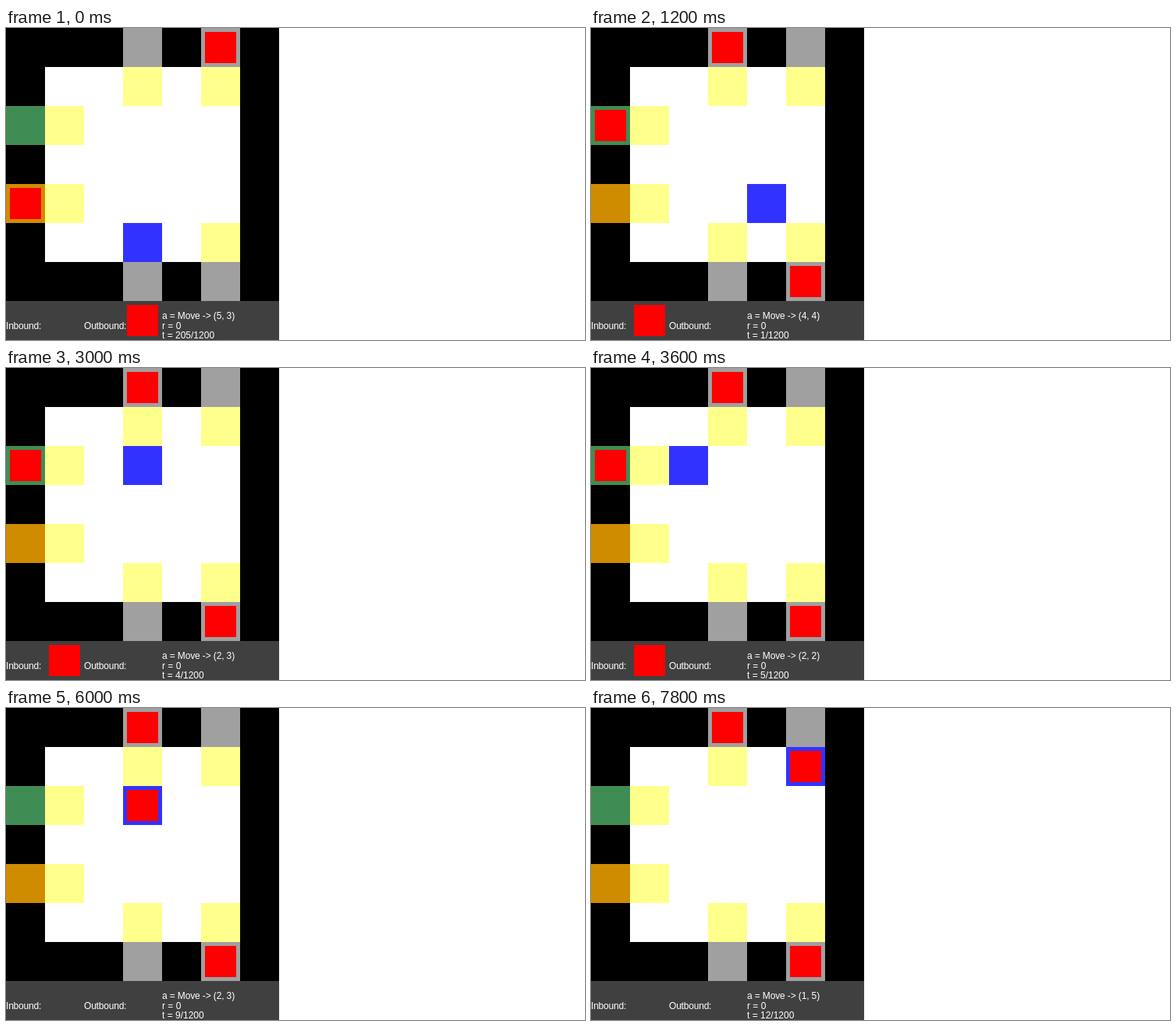
Write an HTML page with a canvas that moves like this. It is 742 by 400 pixels and loops after 8 s.

```html
<!DOCTYPE html>
<html lang="en">
<head>
<meta charset="utf-8">
<title>Grid transport</title>
<style>
  html, body { margin: 0; width: 100%; height: 100%; overflow: hidden; background: #fff; }
  canvas { display: block; }
</style>
</head>
<body>
<canvas id="stage" width="742" height="400"></canvas>
<script>
const ctx = document.getElementById('stage').getContext('2d');
const CELL = 50, STEP = 600, LOOP = 8000;
const COLORS = {
  '#': '#000', '.': '#fff', y: '#ffff8c', g: '#a0a0a0', i: '#408c55', o: '#d08c00'
};
const MAP = [
  '###g#g#',
  '#..y.y#',
  'iy....#',
  '#.....#',
  'oy....#',
  '#..y.y#',
  '###g#g#'
];
// Agent position [row, column] at each step
const PATH = [
  [5, 3], [4, 5], [4, 4], [4, 3], [3, 3], [2, 3], [2, 2],
  [2, 1], [2, 1], [2, 2], [2, 3], [1, 3], [1, 4], [1, 5]
];
const PICKUP = 8;

function cell(row, col, color, inset = 0) {
  ctx.fillStyle = color;
  ctx.fillRect(col * CELL + inset, row * CELL + inset, CELL - 2 * inset, CELL - 2 * inset);
}

const load = (row, col) => cell(row, col, '#f00', 5);

function label(text, x, y, spacing = 0) {
  ctx.letterSpacing = spacing + 'px';
  ctx.fillStyle = '#fff';
  ctx.fillText(text, x, y);
}

function draw(step) {
  const [row, col] = PATH[step];
  const first = step === 0;
  const loaded = step >= PICKUP;

  ctx.fillStyle = '#fff';
  ctx.fillRect(0, 0, 742, 400);
  MAP.forEach((line, r) => [...line].forEach((c, k) => cell(r, k, COLORS[c])));
  ctx.fillStyle = '#404040';
  ctx.fillRect(0, 350, 350, 50);

  cell(row, col, '#3232ff');
  if (loaded) load(row, col);

  if (first) {
    load(0, 5);
    load(4, 0);
    load(7, 3);
  } else {
    load(0, 3);
    load(6, 5);
    if (!loaded) {
      load(2, 0);
      load(7, 1);
    }
  }

  // The reset step still shows the last action and its reward
  const reset = step === 1;
  const target = reset ? [1, 5] : [row, col];
  ctx.font = '12px "Liberation Sans", Arial, sans-serif';
  label('Inbound:', 0, 386, -0.2);
  label('Outbound:', 100, 386, -0.2);
  label(`a = Move -> (${target.join(', ')})`, 200, 373, -0.13);
  label(`r = ${reset ? 1 : 0}`, 200, 386);
  label(`t = ${first ? 205 : step - 1}/1200`, 200, 398);
}

function tick() {
  draw(Math.floor(performance.now() % LOOP / STEP));
  requestAnimationFrame(tick);
}
tick();
</script>
</body>
</html>
```
